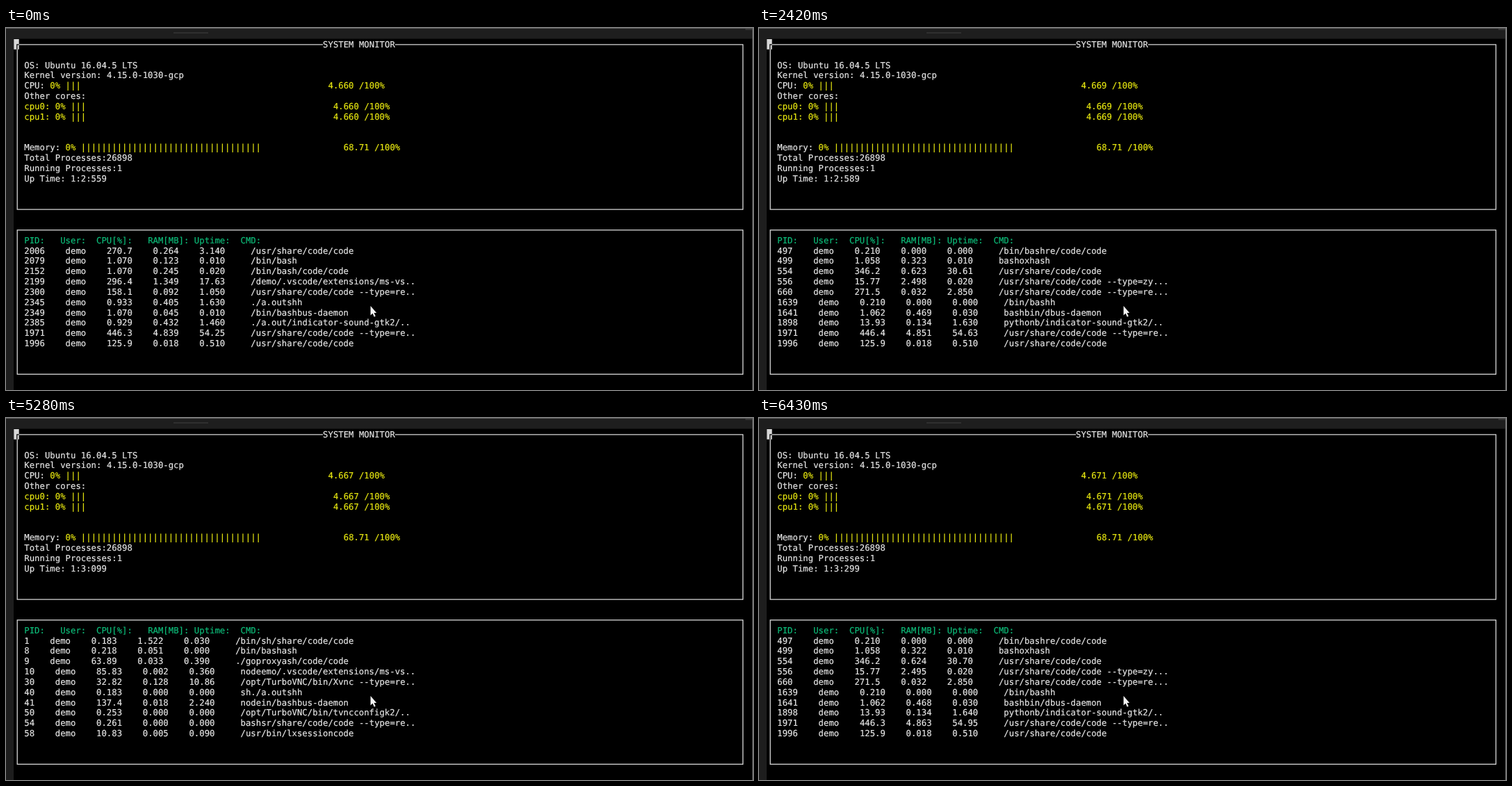
These frames come from a looping animation (1075 by 521 pixels, 6.89 s). An HTML page:

```html
<!DOCTYPE html>
<html lang="en">
<head>
<meta charset="utf-8">
<title>System monitor</title>
<style>
html, body { margin: 0; width: 100%; height: 100%; overflow: hidden; background: #000; }
svg { display: block; width: 1075px; height: 521px; }
text { font-family: "DejaVu Sans Mono", monospace; font-size: 12.31px; text-rendering: geometricPrecision; stroke-width: 0.2; }
.w { fill: #e5e5e5; stroke: #e5e5e5; }
.y { fill: #e5e510; stroke: #e5e510; }
.g { fill: #0dbc79; stroke: #0dbc79; }
.line { fill: none; stroke: #d8d8d8; stroke-width: 1.3; }
</style>
</head>
<body>
<svg viewBox="0 0 1075 521">
  <rect width="1075" height="521" fill="#000"/>
  <rect width="1075" height="15.5" fill="#1e1e1e"/>
  <rect width="1075" height="1" fill="#5a5a5a"/>
  <rect x="241" y="6.5" width="50" height="1" fill="#414141"/>
  <rect x="1064" y="1.5" width="10" height="1" fill="#484848"/>
  <rect x="1074" width="1" height="521" fill="#6a6a6a"/>
  <rect id="edgeTop" y="15" width="11" height="170" fill="#1e1e1e"/>
  <rect id="edgeLow" y="185" width="11" height="336" fill="#1e1e1e"/>
  <path class="line" d="M18 23.8H456M560 23.8H1060.5V261.2H16.2V30"/>
  <rect class="line" x="16.2" y="290.8" width="1044.3" height="207.5"/>
  <rect x="11.3" y="16" width="7.4" height="14.8" fill="#d8d8d8"/>
  <path d="M18.7 23.8H15.8V30.8" fill="none" stroke="#000" stroke-width="1.2"/>
  <g id="fixed"></g>
  <g id="stats"></g>
  <g id="table"></g>
  <path d="M524.6 400V413.4L527.6 410.7L529.8 415.7L531.8 414.8L529.6 409.9H533.2Z" fill="#f4f4f4"/>
</svg>
<script>
const LOOP = 6890, USER = "demo";
const CELL = 7.41, ROW = 14.83, LEFT = 11.5, BASE = 28;
const $ = id => document.getElementById(id);

// Each word sits on its own column of the character grid.
function put(row, col, str, cls = "w") {
  const y = (BASE + row * ROW).toFixed(2);
  const words = [...str.matchAll(/\S+/g)].map(m =>
    `<tspan x="${(LEFT + (col + m.index) * CELL).toFixed(2)}">${m[0]}</tspan>`);
  return `<text y="${y}" class="${cls}">${words.join("")}</text>`;
}

// pid | cpu ram uptime | command; "a>b" gives the value on the first and second visit
const PAGES = {
  late: `2006|270.7 0.264>0.262 3.140|/usr/share/code/code
2079|1.070 0.123 0.010|/bin/bash
2152|1.070 0.245>0.243 0.020|/bin/bash/code/code
2199|296.4 1.349>1.338 17.63|/${USER}/.vscode/extensions/ms-vs..
2300|158.1 0.092>0.091 1.050>1.060|/usr/share/code/code --type=re..
2345|0.933 0.405>0.407 1.630>1.640|./a.outshh
2349|1.070 0.045>0.044 0.010|/bin/bashbus-daemon
2385|0.929 0.432>0.430 1.460>1.480|./a.out/indicator-sound-gtk2/..
1971|446.3>446.4 4.839>4.851 54.25>54.63|/usr/share/code/code --type=re..
1996|125.9 0.018 0.510|/usr/share/code/code`,
  boot: `1|0.183 1.522 0.030|/bin/sh/share/code/code
8|0.218 0.051 0.000|/bin/bashash
9|63.89 0.033 0.390|./goproxyash/code/code
10|85.83 0.002 0.360|node${USER.slice(1)}/.vscode/extensions/ms-vs..
30|32.82 0.128 10.86|/opt/TurboVNC/bin/Xvnc --type=re..
40|0.183 0.000 0.000|sh./a.outshh
41|137.4 0.018 2.240|nodein/bashbus-daemon
50|0.253 0.000 0.000|/opt/TurboVNC/bin/tvncconfigk2/..
54|0.261 0.000 0.000|bashsr/share/code/code --type=re..
58|10.83 0.005 0.090|/usr/bin/lxsessioncode`,
  desk: `68|13.74 0.078 0.470>0.480|python/share/code/code
77|14.32 0.004 0.170|openboxhash
80|76.27 0.015 0.330|lxpanelyash/code/code
86|53.01 0.002 0.200|pcmanfm/.vscode/extensions/ms-vs..
296|8.585 0.000 0.000|/usr/lib/menu-cache/menu-cache...
435|0.371 0.000 0.000|dbus-launch
436|0.507 0.000 0.000|/usr/bin/dbus-daemon
442|41.83 0.000 0.020|/usr/lib/indicator-sound-gtk2/..
443|33.28 0.000 0.000|/usr/lib/x86 64-linux-gnu/indi...
453|24.89 0.000 0.000|/usr/lib/gvfs/gvfsdde`,
  code: `497|0.210 0.000 0.000|/bin/bashre/code/code
499|1.058 0.323>0.322 0.010|bashoxhash
554|346.2 0.623>0.624 30.61>30.70|/usr/share/code/code
556|15.77 2.498>2.495 0.020|/usr/share/code/code --type=zy...
660|271.5 0.032 2.850|/usr/share/code/code --type=re...
1639|0.210 0.000 0.000|/bin/bashh
1641|1.062 0.469>0.468 0.030|bashbin/dbus-daemon
1898|13.93 0.134 1.630>1.640|pythonb/indicator-sound-gtk2/..
1971|446.4>446.3 4.851>4.863 54.63>54.95|/usr/share/code/code --type=re..
1996|125.9 0.018 0.510|/usr/share/code/code`
};

const LOADS = [[0, 4.660], [490, 4.659], [1360, 4.662], [2270, 4.669],
  [3440, 4.668], [4280, 4.667], [5430, 4.666], [6310, 4.671]];
const VIEWS = [[0, "late", 0, "1:2:559"], [490, "boot", 0, "1:2:569"],
  [1360, "desk", 0, "1:2:579"], [2420, "code", 0, "1:2:589"],
  [3440, "late", 1, "1:2:599"], [4430, "boot", 1, "1:3:099"],
  [5430, "desk", 1, "1:3:199"], [6430, "code", 1, "1:3:299"]];

const at = (steps, t) => steps.filter(s => s[0] <= t).pop();

$("fixed").innerHTML =
  put(0, 60, "SYSTEM MONITOR") +
  put(2, 2, "OS: Ubuntu 16.04.5 LTS") +
  put(3, 2, "Kernel version: 4.15.0-1030-gcp") +
  put(4, 2, "CPU:") + put(4, 7, "0% |||", "y") +
  put(5, 2, "Other cores:") +
  put(6, 2, "cpu0: 0% |||", "y") +
  put(7, 2, "cpu1: 0% |||", "y") +
  put(10, 2, "Memory:") + put(10, 10, "0% " + "|".repeat(35), "y") +
  put(10, 64, "68.71 /100%", "y") +
  put(11, 2, "Total Processes:26898") +
  put(12, 2, "Running Processes:1") +
  put(19, 2, "PID:   User:  CPU[%]:   RAM[MB]: Uptime:  CMD:", "g");

function showLoad(load) {
  const label = load.toFixed(3) + " /100%";
  $("stats").innerHTML = [[4, 61], [6, 62], [7, 62]]
    .map(([row, col]) => put(row, col, label, "y")).join("");
}

function showTable([, page, visit, uptime]) {
  const gap = "    ";
  const rows = PAGES[page].split("\n").map((line, i) => {
    const [pid, nums, cmd] = line.split("|");
    const vals = nums.split(" ").map(n => n.split(">")[visit] || n.split(">")[0]);
    return put(20 + i, 2, [pid, USER, ...vals, " " + cmd].join(gap));
  });
  $("table").innerHTML = put(13, 2, "Up Time: " + uptime) + rows.join("");
}

let lastLoad, lastView;
function draw(t) {
  const load = at(LOADS, t), view = at(VIEWS, t);
  if (load !== lastLoad) showLoad((lastLoad = load)[1]);
  if (view !== lastView) showTable(lastView = view);
  $("edgeTop").setAttribute("width", t >= 1360 && t < 2270 ? 9 : 11);
  $("edgeLow").setAttribute("width", t >= 1360 && t < 2420 ? 9 : 11);
}

function tick() {
  draw(performance.now() % LOOP);
  requestAnimationFrame(tick);
}
tick();
</script>
</body>
</html>
```
